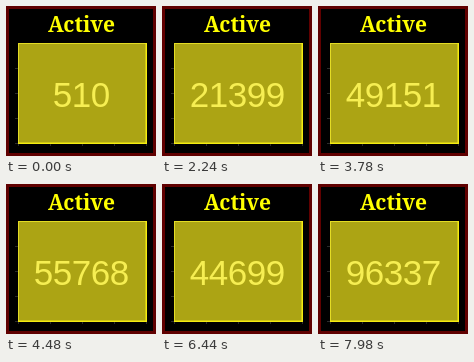
Animation, 150 px wide and 150 px high, one loop 8 s. Source, as an HTML page:

```html
<!DOCTYPE html>
<html lang="en">
<head>
<meta charset="utf-8">
<title>Active</title>
<style>
  html, body { margin: 0; width: 100%; height: 100%; overflow: hidden; background: #000; }
  svg { display: block; width: 150px; height: 150px; }
  text { text-anchor: middle; }
  .title { font: bold 21px "Noto Serif", serif; fill: #ff0; }
  .count { font: 35px "Liberation Sans", Arial, sans-serif; letter-spacing: -.46px; fill: #f6ee52; }
</style>
</head>
<body>
<svg viewBox="0 0 150 150">
  <rect width="150" height="150" fill="#600000"/>
  <rect x="3" y="3" width="144" height="144" fill="#000"/>
  <path d="M9 62.5h3M9 87.5h3M9 112.5h3M9 137.5h3M12.5 137v3M44.5 137v3M76.5 137v3M108.5 137v3M140.5 137v3" stroke="#2c2c2c"/>
  <rect x="12.5" y="37.5" width="128" height="100" fill="#aca414" stroke="#e4dc24"/>
  <path d="M140.25 37V137.25H12" fill="none" stroke="#f4ec10" stroke-width="1.5"/>
  <text class="title" x="75.5" y="26">Active</text>
  <text class="count" id="count" x="75.3" y="100.6"></text>
</svg>
<script>
  const LOOP = 8000;
  // [step, active cases]: rise, plateau, dip, second rise
  const keys = [[0, 510], [7, 5907], [19, 37802], [29, 55768], [37, 44522], [49, 54247], [54, 96337]];

  // The first seven steps are slower than the rest.
  function stepAt(t) {
    if (t < 140) return 0;
    if (t < 1400) return 1 + Math.floor((t - 140) / 210);
    return 7 + Math.floor((t - 1400) / 140);
  }

  // Slope through the neighbours of a key point.
  function slope(i) {
    const [s0, v0] = keys[Math.max(0, i - 1)];
    const [s1, v1] = keys[Math.min(keys.length - 1, i + 1)];
    return (v1 - v0) / (s1 - s0);
  }

  // Cubic Hermite curve through the key points.
  function valueAt(step) {
    const i = Math.max(1, keys.findIndex(k => k[0] >= step));
    const [s0, v0] = keys[i - 1], [s1, v1] = keys[i];
    const span = s1 - s0, u = (step - s0) / span, w = 1 - u;
    return Math.round(
      v0 * w * w * (1 + 2 * u) + v1 * u * u * (3 - 2 * u) +
      span * u * w * (slope(i - 1) * w - slope(i) * u)
    );
  }

  const count = document.getElementById("count");

  function draw() {
    count.textContent = valueAt(stepAt(performance.now() % LOOP));
    requestAnimationFrame(draw);
  }
  draw();
</script>
</body>
</html>
```
